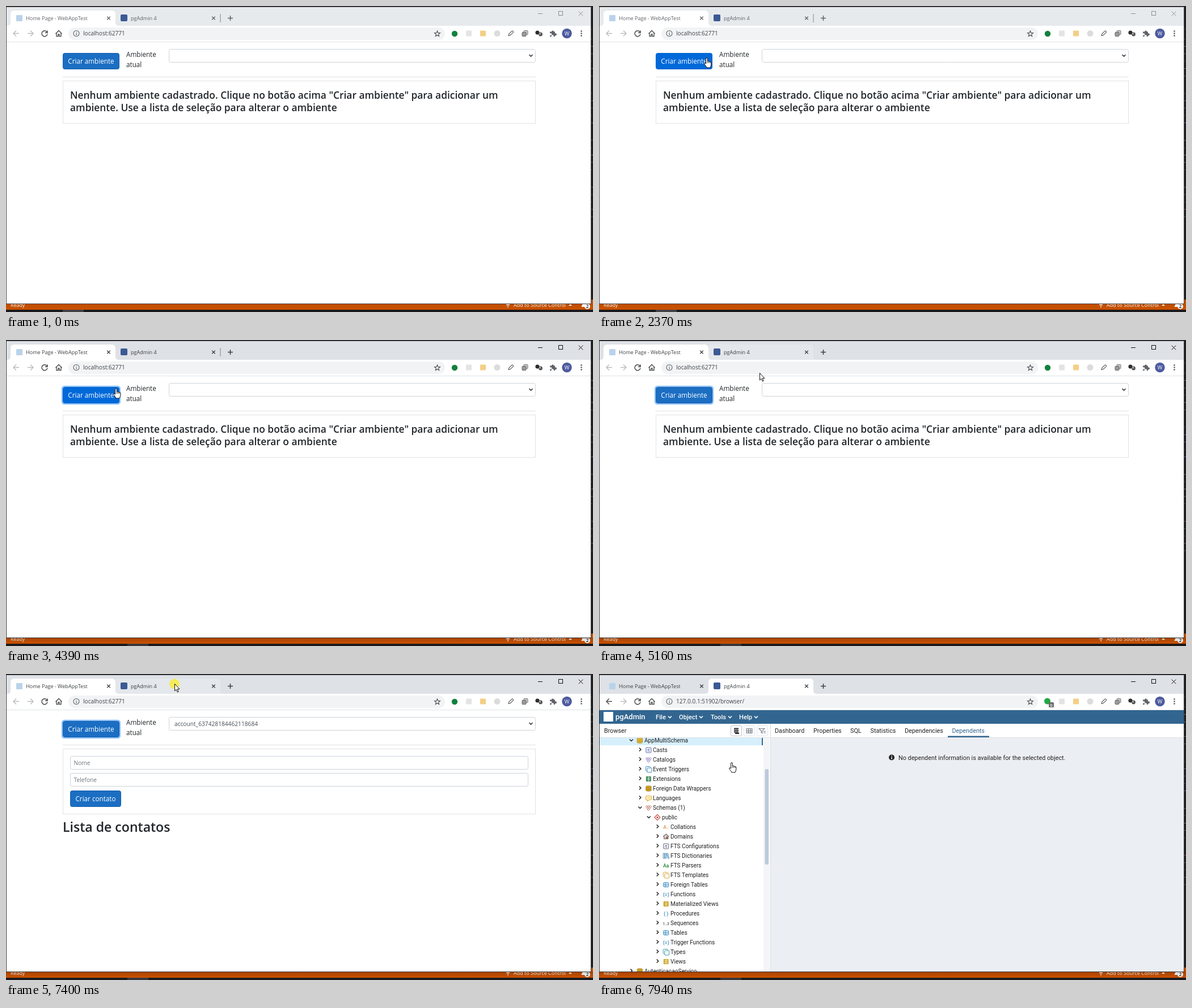
Animation of 1035 by 541 pixels, one loop 8 s. Source, as an HTML page with a canvas:

```html
<!DOCTYPE html>
<html lang="pt">
<head>
<meta charset="utf-8">
<title>Ambientes</title>
<style>
html, body { margin: 0; width: 100%; height: 100%; overflow: hidden; background: #1e1e1e; }
canvas { display: block; }
</style>
</head>
<body>
<canvas id="stage" width="1035" height="541"></canvas>
<script>
const ctx = document.getElementById('stage').getContext('2d');
const LOOP = 8000;
const UI = '"Open Sans", "Noto Sans", sans-serif';
const ROBOTO = 'Roboto, Arial, sans-serif';
const INK = '#212529', GREY = '#5f6368', NAVY = '#326690';

// Moments of hard change, in ms
const ACTIVATE = 3310, CLICKED = 3390, CREATED = 5250, SWITCHED = 7480;

// Pointer moves: start, end, then the points visited in equal steps
const MOVES = [
  [190, 420, [[776, 455], [560, 340], [400, 256], [336, 219]]],
  [570, 820, [[312, 197], [278, 166], [256, 146], [249, 139]]],
  [1050, 1050, [[248, 138]]],
  [1670, 1830, [[235, 143], [230, 143], [228, 143]]],
  [1980, 2450, [[226, 141], [219, 131], [211, 118], [201, 105], [194, 97], [190, 92], [188, 90]]],
  [4390, 4860, [[194, 86], [210, 75], [232, 62], [258, 46], [282, 30], [296, 20], [300, 16]]],
  [5160, 5330, [[283, 58], [283, 62], [284, 66]]],
  [5480, 6170, [[290, 74], [303, 88], [320, 100], [336, 106], [344, 99],
    [346, 87], [341, 74], [328, 59], [313, 45], [306, 37]]],
  [6330, 6560, [[304, 30], [302, 24], [300, 18], [298, 14]]],
  [6710, 6710, [[297, 13]]],
  [7250, 7400, [[297, 15], [297, 17], [297, 17]]],
  [7790, 7940, [[284, 56], [250, 126], [234, 157]]]
];
const CLICKS = [[3310, 3465], [7020, 7100], [7250, 7480]];

function pointer(t) {
  const move = MOVES.filter(m => m[0] <= t).pop();
  if (!move) return null;
  const [start, end, points] = move;
  const last = points.length - 1;
  if (!last || t >= end) return points[last];
  return points[Math.floor((t - start) / (end - start) * last + 0.1)];
}

const inside = (p, x, y, r, b) => !!p && p[0] >= x && p[0] < r && p[1] >= y && p[1] < b;

// Drawing helpers
function rect(x, y, w, h, fill) {
  ctx.fillStyle = fill;
  ctx.fillRect(x, y, w, h);
}

function rounded(x, y, w, h, r, fill, stroke, width = 1) {
  ctx.beginPath();
  ctx.roundRect(x, y, w, h, r);
  paint(fill, stroke, width);
}

function paint(fill, stroke, width = 1) {
  if (fill) { ctx.fillStyle = fill; ctx.fill(); }
  if (stroke) { ctx.strokeStyle = stroke; ctx.lineWidth = width; ctx.stroke(); }
}

function circle(x, y, r, fill, stroke, width) {
  ctx.beginPath();
  ctx.arc(x, y, r, 0, 7);
  paint(fill, stroke, width);
}

function path(d, x, y, fill, stroke, width) {
  ctx.save();
  ctx.translate(x, y);
  const p = new Path2D(d);
  if (fill) { ctx.fillStyle = fill; ctx.fill(p); }
  if (stroke) { ctx.strokeStyle = stroke; ctx.lineWidth = width || 1; ctx.stroke(p); }
  ctx.restore();
}

function text(s, x, y, size, color = INK, weight = 400, family = UI, align = 'left') {
  ctx.font = `${weight} ${size}px ${family}`;
  ctx.fillStyle = color;
  ctx.textAlign = align;
  ctx.fillText(s, x, y);
}

const cross = (x, y, r, color, w) => path(`M${-r} ${-r}L${r} ${r}M${r} ${-r}L${-r} ${r}`, x, y, null, color, w);
const chevron = (x, y, color, w = 1.5) => path('M-3 -1.5L0 1.5L3 -1.5', x, y, null, color, w);

// Editor behind the browser window
function backdrop(active, taskX) {
  rect(0, 0, 1035, 541, '#1f1f23');
  const colors = ['#8c4a4a', '#4f7d5a', '#4a6c9c', '#77777c'];
  for (let i = 0; i < 22; i++) {
    const y = 40 + (i * 83) % 345;
    rect(1032, y, 1 + i % 3, 1, colors[i % 4]);
  }
  rect(0, 519, 1035, 18, '#ca5100');
  text('Ready', 8, 532, 8.9, '#fff');
  text('Add to Source Control', 895, 532, 9, '#fff');
  path('M0 7V0M-3 3L0 0L3 3', 885, 526, null, '#fff', 1.2);
  path('M0 3L3 0L6 3Z', 992, 527, '#fff');
  path('M0 6C2 5 1 0 5 0S8 5 10 6Z', 1014, 526, '#fff');
  circle(1025, 531, 5, '#fff');
  text('2', 1025, 534, 8, '#222', 600, UI, 'center');
  rect(0, 537, 1035, 4, '#19191d');
  rect(taskX, 537, 37, 4, active ? '#37373b' : '#424246');

  const shade = ctx.createLinearGradient(0, 526, 0, 537);
  shade.addColorStop(0, `rgba(0,0,0,${active ? 0.18 : 0.06})`);
  shade.addColorStop(1, 'rgba(0,0,0,0)');
  rect(0, 526, 1035, 11, shade);
  rect(0, 1, 1032, 526, active ? '#3a3a3c' : '#4a4a4c');
}

function tabShape(x, fill) {
  path('M-6 27Q0 27 0 21V7Q0 0 7 0H178Q185 0 185 7V21Q185 27 191 27Z', x, 8, fill);
}

function titleBar(active, switched, glow) {
  const strip = active ? '#dee1e6' : '#e7eaed';
  rect(1, 2, 1030, 33, strip);
  if (glow && !switched) {
    const g = ctx.createLinearGradient(193, 0, 378, 0);
    g.addColorStop(0, '#e4e7eb');
    g.addColorStop(0.58, '#f5f6f7');
    g.addColorStop(1, '#eaecef');
    tabShape(193, g);
  }
  tabShape(switched ? 193 : 8, '#fff');
  const dim = active ? '#3c4043' : '#5f6368';
  rounded(18, 16, 11, 11, 1, '#b9d3ea');
  text('Home Page - WebAppTest', 35, 25, 9.05, dim);
  rounded(202, 15, 12, 12, 2, '#3b5a94');
  text('pgAdmin 4', 220, 25, 9.05, dim);
  cross(181, 21.5, 2.8, dim, 1.3);
  cross(366, 21.5, 2.8, dim, 1.3);
  if (!switched && !glow) rect(377.5, 14, 1, 15, '#80868b');
  path('M-4.5 0H4.5M0 -4.5V4.5', 395.5, 21.5, null, dim, 1.5);

  const ctl = active ? '#111' : '#8b8e92';
  rect(938, 13, 8, 1, ctl);
  ctx.strokeStyle = ctl;
  ctx.lineWidth = 1;
  ctx.strokeRect(974.5, 9.5, 7, 7);
  cross(1013.5, 13.5, 3.8, ctl, 1);
}

function arrow(x, dir, color) {
  path(`M${-5 * dir} 0H${5 * dir}M0 -5L${5 * dir} 0L0 5`, x, 48.5, null, color, 1.4);
}

function toolbar(switched, hover) {
  rect(1, 35, 1030, 28, '#fff');
  rect(1, 63, 1030, 1, '#dfe1e5');
  arrow(18, -1, switched ? '#4a4e52' : '#babcbe');
  arrow(43, 1, '#babcbe');
  path('M4.2 -2.6A5 5 0 1 0 5 1M5 -5V-1.2H1', 68, 48.5, null, '#44484b', 1.5);
  path('M-5.5 .5L0 -5L5.5 .5M-4 -.5V5H-1V1.5H1V5H4V-.5', 93, 48.5, null, '#44484b', 1.3);
  rounded(110, 38, 664, 22, 11, hover ? '#e9ebee' : '#f1f3f4');
  circle(124, 48.5, 5, null, GREY, 1.1);
  rect(123.5, 48, 1.2, 3.5, GREY);
  rect(123.5, 45.5, 1.2, 1.3, GREY);
  text(switched ? '127.0.0.1:51902/browser/' : 'localhost:62771', 136, 52, 10.1, '#3f4347');
  path('M0 -5L1.4 -1.6L5 -1.4L2.2 .9L3.1 4.5L0 2.5L-3.1 4.5L-2.2 .9L-5 -1.4L-1.4 -1.6Z',
    760.5, 49, null, '#4a4e52', 1.1);

  if (switched) {
    circle(790.5, 48, 5.5, '#22a745');
    rounded(793, 50, 9, 9, 1.5, '#6b6b6b');
    text('0', 797.5, 57.5, 7.5, '#fff', 600, UI, 'center');
  } else {
    circle(791, 49, 5.2, '#12813f');
  }
  rounded(811, 43.5, 10, 10, 1, '#e4e4e4');
  rounded(836, 43.5, 10, 10, 1, '#f3cf88');
  circle(866, 48.5, 5.5, '#dcdcdc');
  path('M-4 4L-3.2 .8L2 -4.2Q5 -4.8 4.4 -1.8L-1 3.2Z', 890, 48.5, null, GREY, 1.2);
  rounded(913, 43.5, 7, 7, 1, '#c9c9c9', '#777');
  rounded(910, 46.5, 7, 7, 1, '#9b9b9b', '#666');
  circle(937, 47, 3.6, '#2d2d2d');
  circle(942.5, 50, 3.4, '#555');
  circle(941.5, 49, 1.2, '#ddd');
  path('M-5 -3H-2A2 2 0 1 1 2 -3H4V0A2 2 0 1 1 4 3.5V5.5H1.5A2 2 0 1 0 -2 5.5H-5V3A2 2 0 1 0 -5 0Z',
    964, 48.5, GREY);
  circle(989, 48.5, 8.7, '#4d5b9f');
  text('W', 989, 52, 9, '#fff', 400, UI, 'center');
  for (const y of [44.5, 48.5, 52.5]) circle(1014.5, y, 1.3, '#50545a');
}

// Web application page
function button(label, x, y, w, hover, ring) {
  if (ring) rounded(x - 1, y - 1, w + 2, 31, 4, null, 'rgba(60,150,250,.55)', 2.4);
  rounded(x + 0.5, y + 0.5, w - 1, 28, 3, hover ? '#0069d9' : '#1b6ec2', hover ? '#0062cc' : '#1861ac');
  text(label, x + w / 2, y + 18.7, 11.7, '#fff', 400, UI, 'center');
}

function field(label, y) {
  rounded(113.5, y + 0.5, 807, 23, 2.5, '#fff', '#ced4da');
  text(label, 119.5, y + 16, 10.2, '#6c757d');
}

function card(h) {
  ctx.strokeStyle = '#dee2e6';
  ctx.lineWidth = 1;
  ctx.strokeRect(100.5, 132.5, 833, h);
}

function appPage(created, hover, ring) {
  button('Criar ambiente', 100, 83, 100, hover, ring);
  text('Ambiente', 212, 90, 11.7);
  text('atual', 212, 108, 11.7);
  rounded(287.5, 76.5, 646, 23, 3, '#fff', '#ced4da');
  chevron(925.5, 87.5, '#343a40', 1.7);
  rect(100, 125, 834, 1, '#e1e1e1');
  if (!created) {
    card(75);
    text('Nenhum ambiente cadastrado. Clique no botão acima "Criar ambiente" para adicionar um',
      113, 164, 17.38, INK, 600);
    text('ambiente. Use a lista de seleção para alterar o ambiente', 113, 185.5, 17.38, INK, 600);
    return;
  }
  text('account_637428184462118684', 297, 92, 10.2, '#495057');
  card(115);
  field('Nome', 145);
  field('Telefone', 175);
  button('Criar contato', 113, 206, 90);
  text('Lista de contatos', 100, 279, 23.1, INK, 600);
}

// Database browser page: depth, label, icon, colour, expanded
const TREE = [
  [0, 'AppMultiSchema', 'db', '#e5b93c', 1],
  [1, 'Casts', 'sheet', '#5b6fae'],
  [1, 'Catalogs', 'gem', '#8b6fc0'],
  [1, 'Event Triggers', 'stack', '#3f8fc4'],
  [1, 'Extensions', 'block', '#3c8a5f'],
  [1, 'Foreign Data Wrappers', 'db', '#c9a227'],
  [1, 'Languages', 'bubble', '#e3b030'],
  [1, 'Schemas (1)', 'gem', '#b8604c', 1],
  [2, 'public', 'diamond', '#c0473c', 1],
  [3, 'Collations', 'A↓', '#dca266'],
  [3, 'Domains', 'house', '#6d6478'],
  [3, 'FTS Configurations', 'sheet', '#666b80'],
  [3, 'FTS Dictionaries', 'books', '#3f7fb0'],
  [3, 'FTS Parsers', 'Aa', '#3b8f4a'],
  [3, 'FTS Templates', 'stack', '#dfa936'],
  [3, 'Foreign Tables', 'grid', '#3f8fc4'],
  [3, 'Functions', '(≡)', '#3f8fc4'],
  [3, 'Materialized Views', 'block', '#c9a227'],
  [3, 'Procedures', '( )', '#3f8fc4'],
  [3, 'Sequences', '1..3', '#6a6a6a'],
  [3, 'Tables', 'grid', '#3f8fc4'],
  [3, 'Trigger Functions', '(≡)', '#3f8fc4'],
  [3, 'Types', 'stack', '#3f9fa8'],
  [3, 'Views', 'block', '#d0aa35'],
  [0, 'AutenticacaoServico', 'db', '#c9a227']
];

const ICONS = {
  sheet: (x, y, c) => {
    rounded(x - 4.5, y - 4.5, 9, 9, 1, '#f3f4fa', c);
    path('M-2 2L2 -2M-2 -1H1M0 2H2', x, y, null, c);
  },
  stack: (x, y, c) => {
    rounded(x - 5, y - 5, 8, 8, 1, '#fff', c);
    rounded(x - 2.5, y - 2.5, 8, 8, 1, '#f6f9fc', c);
  },
  block: (x, y, c) => {
    rounded(x - 4.5, y - 4.5, 9, 9, 1, c);
    path('M-2.5 -1.5H3M-2.5 1.5H3M0 -4V4', x, y, null, '#f3efcf', 0.9);
  },
  grid: (x, y, c) => {
    rounded(x - 4.5, y - 4, 9, 8, 1, '#eaf4fb', c);
    path('M-4.5 -1H4.5M-4.5 1.5H4.5M-1 -4V4', x, y, null, c, 0.9);
  },
  db: (x, y, c) => {
    for (const dy of [2.6, 0, -2.6]) {
      ctx.beginPath();
      ctx.ellipse(x, y + dy, 5, 2.2, 0, 0, 7);
      paint(c, '#a57f1a', 0.7);
    }
  },
  gem: (x, y, c) => {
    for (const [dx, dy] of [[-3, -2], [0, -2], [3, -2], [-1.5, 0.5], [1.5, 0.5], [0, 3]])
      path('M0 -2L2 0L0 2L-2 0Z', x + dx, y + dy, '#fff', c, 0.9);
  },
  diamond: (x, y, c) => {
    path('M0 -5L5 0L0 5L-5 0Z', x, y, '#fff', c, 1.1);
    path('M0 -2L2 0L0 2L-2 0Z', x, y, c);
  },
  bubble: (x, y, c) => {
    path('M-5 -2Q-5 -4 -3 -4H3Q5 -4 5 -2V1Q5 3 3 3H1L-2 5V3H-3Q-5 3 -5 1Z', x, y, '#fff6da', c, 1.1);
    rect(x - 3, y - 1, 6, 1, c);
  },
  house: (x, y, c) => {
    path('M-5 0L0 -4.5L5 0M-3.5 -1V4H3.5V-1', x, y, '#d8cdb8', c, 1.1);
    rect(x, y, 3, 4, '#9a5f43');
  },
  books: (x, y, c) => {
    for (const dx of [-5, -2]) rounded(x + dx, y - 4.5, 2.5, 9, 0.5, '#e4f0f8', c, 0.9);
    path('M1 -4L3 -4.5L5.5 4L3.5 4.5Z', x, y, '#e4f0f8', c, 0.9);
  }
};

function treeRow([depth, label, icon, color, open], i) {
  const y = 117 + 17 * i, x = 57 + 15.4 * depth;
  if (open) chevron(x, y, '#222');
  else path('M-1.5 -3L1.5 0L-1.5 3', x, y - 0.5, null, '#222', 1.5);
  if (ICONS[icon]) ICONS[icon](x + 15, y + 0.5, color);
  else text(icon, x + 15, y + 3.5, icon.length > 3 ? 6.5 : 8.5, color, 700, ROBOTO, 'center');
  text(label, Math.round(x + 22.8), y + 4, 10.1, '#222', 400, ROBOTO);
}

function panelButton(x, shape, dark) {
  rounded(x - 9.5, 91.5, 19, 18, 2, '#fff', dark ? '#bac1cd' : '#dfe3ea');
  path(shape, x, 100.5, null, dark ? '#222' : '#7b8088', dark ? 2 : 1.1);
}

function dbPage() {
  rect(1, 64, 1030, 24, NAVY);
  rect(8, 67, 17, 17, '#fff');
  text('pgAdmin', 29, 80, 13, '#fff', 500, ROBOTO);
  for (const [label, x, end] of [['File', 100, 125], ['Object', 141, 180], ['Tools', 197, 231], ['Help', 247, 277]]) {
    text(label, x, 79.5, 11.2, '#fff', 500, ROBOTO);
    chevron(end, 76, '#fff', 1.6);
  }
  rect(303, 112, 728, 414, '#ebeef3');
  rect(1, 112, 1030, 1, '#dde0e6');
  text('Browser', 9, 103.5, 10.8, '#222', 400, ROBOTO);
  panelButton(242, 'M-4 -4H4M-4 -1H4M-4 2H4M-2 4.5H5', true);
  panelButton(265, 'M-5 -4H5V4H-5ZM-5 -1H5M-5 1.5H5M-1.5 -4V4M2 -4V4');
  panelButton(288, 'M-6 -4H4L0 0V4L-2 3V0ZM2 1H6M2 3.5H6');

  const tabs = [['Dashboard', 310], ['Properties', 378], ['SQL', 443], ['Statistics', 478.5], ['Dependencies', 539]];
  for (const [label, x] of tabs) text(label, x, 103.5, 10.8, '#222', 400, ROBOTO);
  text('Dependents', 622.5, 103.5, 10.8, NAVY, 400, ROBOTO);
  rect(615, 109.5, 73, 2.5, NAVY);

  ctx.save();
  ctx.beginPath();
  ctx.rect(1, 113, 300, 413);
  ctx.clip();
  rect(1, 113, 286, 13, '#d6effc');
  rect(287, 113, 2, 13, NAVY);
  TREE.forEach(treeRow);
  rect(290, 113, 11, 413, '#f4f5f7');
  rounded(292.5, 168, 6.5, 169, 3, '#bccadb');
  ctx.restore();
  rect(302, 88, 1, 438, '#d8dce3');

  circle(516, 147.5, 5, '#222');
  rect(515.3, 147, 1.6, 3.5, '#fff');
  rect(515.3, 144.4, 1.6, 1.6, '#fff');
  text('No dependent information is available for the selected object.', 528, 152, 10.8, '#222', 400, ROBOTO);
}

function drawPointer([x, y], hand, pressed) {
  if (pressed) circle(x, y + 0.5, 9, 'rgba(255,238,0,.62)');
  ctx.lineJoin = 'round';
  if (hand) {
    path('M-1.4 10V1Q-1.4 -.3 0 -.3T1.4 1V5.4Q3 4.6 3.6 6Q5.2 5.4 5.8 6.8Q7.6 6.2 7.8 8V11.5Q7.6 14 6 17H0Q-1 14.5 -3.6 11.6Q-5 9.6 -4 9Q-3 8.4 -1.4 10Z',
      x, y, '#fff', '#111', 1);
    path('M1.4 5.4V9M3.6 6V9M5.8 6.8V9', x, y, null, '#111', 0.8);
  } else {
    path('M.5 .5V13L3.3 10.4L5.3 15L7.2 14.2L5.2 9.7H9Z', x, y, '#fff', '#111', 1);
  }
  ctx.lineJoin = 'miter';
}

function draw(t) {
  const active = t >= ACTIVATE, clicked = t >= CLICKED, switched = t >= SWITCHED;
  const p = pointer(t);
  const onTab = q => inside(q, 193, 8, 378, 35);
  const onButton = !switched && inside(p, 100, 83, 200, 112);
  const onTree = switched && inside(p, 1, 113, 288, 526);

  backdrop(active, clicked ? 214 : 100);
  rect(1, 2, 1030, 524, '#fff');
  titleBar(active, switched, onTab(p) || onTab(pointer(t - 90)));
  toolbar(switched, inside(p, 110, 38, 774, 58));
  if (switched) dbPage();
  else appPage(t >= CREATED, onButton, clicked);
  if (p) drawPointer(p, onButton || onTree, CLICKS.some(([a, b]) => t >= a && t < b));
}

function frame() {
  draw(performance.now() % LOOP);
  requestAnimationFrame(frame);
}
frame();
</script>
</body>
</html>
```
